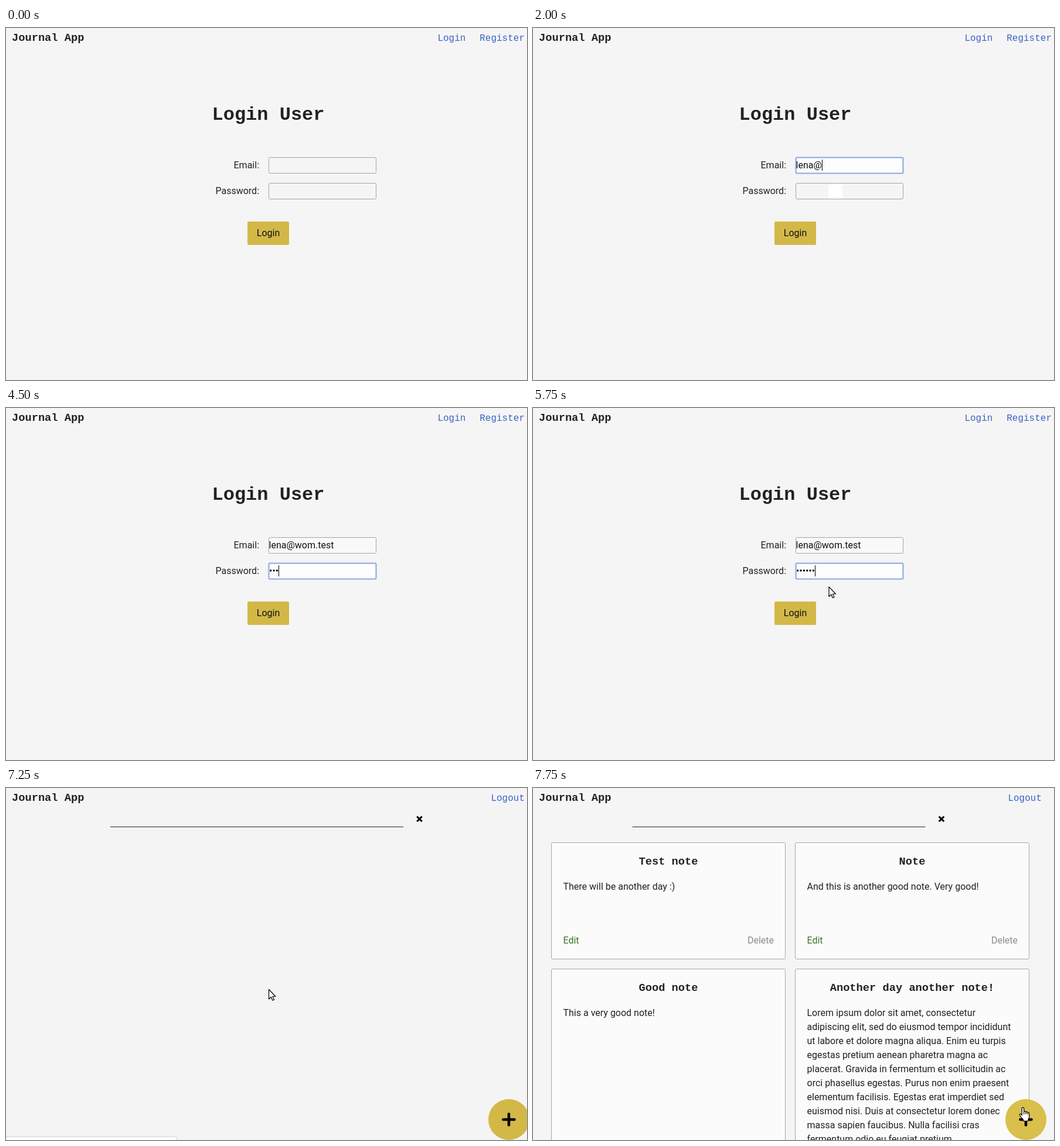
These frames come from a looping animation (889 px wide and 602 px high, 8000 ms). An HTML page:

```html
<!DOCTYPE html>
<html lang="en">
<head>
<meta charset="utf-8">
<title>Journal App</title>
<style>
  html, body { margin: 0; width: 100%; height: 100%; overflow: hidden; background: #f5f5f5; }
  svg { display: block; width: 100%; height: 100%; }
  text { font: 16px Roboto, sans-serif; fill: #222; }
  .mono { font-family: "Courier New", "Liberation Mono", monospace; }
  .title { font-size: 18.72px; font-weight: bold; }
  .heading { font-size: 32px; font-weight: bold; }
  .link { fill: #3b63c4; }
  .edit { fill: #3d7429; }
  .delete { fill: #8b8b8b; }
  .end { text-anchor: end; }
  .mid { text-anchor: middle; }
  .field { fill: #f5f5f5; stroke: #a3a3a3; }
  .field.filled { fill: #f9f9f9; }
  .field.focus { fill: #fdfdfd; stroke: #86a8e0; stroke-width: 2; }
  .button { fill: #d3b847; }
  .button.hover { fill: #f2d75f; }
  .button.focus { stroke: #8db2c4; stroke-width: 2; }
  .card { fill: #fbfbfb; stroke: #a8a8a8; }
  .cursor { fill: #fff; stroke: #000; stroke-width: 1.2; stroke-linejoin: round; }
</style>
</head>
<body>
<svg viewBox="0 0 889 602">
  <rect id="page" width="889" height="602"/>
  <text class="mono title" x="10" y="22">Journal App</text>

  <g id="login">
    <text class="mono link" x="736.4" y="22">Login</text>
    <text class="mono link" x="808.2" y="22">Register</text>
    <text class="mono heading mid" x="447.5" y="157">Login User</text>
    <text class="end" x="432" y="240">Email:</text>
    <text class="end" x="432" y="284">Password:</text>
    <rect id="emailField" class="field" x="448.5" y="221.5" width="183" height="27" rx="2"/>
    <rect id="passwordField" class="field" x="448.5" y="265.5" width="183" height="27" rx="2"/>
    <rect id="patch" x="504" y="266" width="24" height="26" fill="#fff"/>
    <text id="email" x="448.5" y="240" style="fill:#111"></text>
    <g id="dots"></g>
    <rect id="caret" width="1" height="19"/>
    <rect id="button" class="button" x="412" y="331" width="71" height="40" rx="2"/>
    <text class="mid" x="447.5" y="356" style="fill:#111">Login</text>
  </g>

  <g id="journal">
    <g id="cards"></g>
    <g id="chrome">
      <text class="mono link end" x="885" y="22">Logout</text>
      <path id="search" d="M178 66.5h500" stroke="#222"/>
      <path id="clear" d="M701.2 48.7l8.6 8.6m0-8.6l-8.6 8.6" stroke="#000" stroke-width="3"/>
      <g id="add">
        <circle id="disc" cx="858" cy="567" r="35"/>
        <path d="M848.5 567h19m-9.5-9.5v19" stroke="#000" stroke-width="4.6" stroke-linecap="round"/>
      </g>
    </g>
    <rect id="status" x="-5" y="596.5" width="296.5" height="20" rx="4" fill="#fff" stroke="#cfcfcf"/>
  </g>

  <g id="cursor">
    <path id="beam" d="M-3.5 -8.5h2.5l1 1 1-1h2.5M0 -7.5v15M-3.5 8.5h2.5l1-1 1 1h2.5" fill="none" stroke="#222"/>
    <path id="arrow" class="cursor" d="M0 0V16.5L3.8 13 6.4 18.7 9 17.5 6.5 12H11.5Z"/>
    <path id="hand" class="cursor" d="M-1.7 14V2Q-1.7 .3 0 .3T1.7 2V7.5Q3.4 5.8 5 8.2 6.7 7 8.2 9 10.6 8.4 10.8 11V16Q10.8 19 9 20.5V23.5H.5V21Q-3.5 17.5-5.7 13.5-6 11.5-4.5 11.4-3 11.5-1.7 14ZM1.7 7.5V12M5 8.2V12M8.2 9V12.5"/>
  </g>
</svg>
<script>
const $ = id => document.getElementById(id);
const show = (id, on) => $(id).style.display = on ? '' : 'none';

const LOOP = 8000, STEP = 250;
const address = 'lena@wom.test';

const notes = [
  [31, 93, 'Test note', ['There will be another day :)']],
  [447, 93, 'Note', ['And this is another good note. Very good!']],
  [31, 309, 'Good note', ['This a very good note!']],
  [447, 309, 'Another day another note!', [
    'Lorem ipsum dolor sit amet, consectetur',
    'adipiscing elit, sed do eiusmod tempor incididunt',
    'ut labore et dolore magna aliqua. Enim eu turpis',
    'egestas pretium aenean pharetra magna ac',
    'placerat. Gravida in fermentum et sollicitudin ac',
    'orci phasellus egestas. Purus non enim praesent',
    'elementum facilisis. Egestas erat imperdiet sed',
    'euismod nisi. Duis at consectetur lorem donec',
    'massa sapien faucibus. Nulla facilisi cras',
    'fermentum odio eu feugiat pretium']]
];

$('cards').innerHTML = notes.map(([x, y, title, lines]) => `
  <g transform="translate(${x} ${y})">
    <rect class="card" x=".5" y=".5" width="399" height="${y < 300 ? 199 : 400}" rx="2"/>
    <text class="mono title mid" x="200" y="38">${title}</text>
    ${lines.map((line, i) => `<text x="20.5" y="${81 + 24 * i}">${line}</text>`).join('')}
    ${y < 300 ? '<text class="edit" x="20.5" y="173">Edit</text><text class="delete end" x="380" y="173">Delete</text>' : ''}
  </g>`).join('');

// [start time, value] pairs; each value holds until the next one
const emailLength = [[0, 0], [1500, 1], [1750, 3], [2000, 5], [2500, 7], [2750, 8], [3000, 10], [3250, 11], [3500, 13]];
const dotCount = [[0, 0], [4250, 1], [4500, 3], [5000, 5], [5250, 6]];
const focused = [[0, ''], [750, 'email'], [3750, 'password'], [6250, 'button']];
const pointer = [
  [0, null], [250, ['beam', 516, 279]], [500, ['beam', 543, 239]], [1000, ['beam', 490, 247]], [1500, null],
  [5500, ['beam', 572, 238]], [5750, ['arrow', 505, 306]], [6000, ['hand', 455.5, 344]],
  [7000, ['arrow', 448.5, 344.5]], [7500, ['arrow', 650.5, 450.5]], [7750, ['hand', 836, 546]]
];
const at = (track, t) => track.findLast(([start]) => start <= t)[1];

function drawLogin(t) {
  const focus = at(focused, t), length = at(emailLength, t), dots = at(dotCount, t);
  $('email').textContent = address.slice(0, length);
  $('dots').innerHTML = Array.from({ length: dots }, (_, i) =>
    `<circle cx="${451.7 + 5.35 * i}" cy="278" r="1.7"/>`).join('');
  for (const [name, filled] of [['email', length], ['password', dots]]) {
    $(name + 'Field').classList.toggle('focus', focus === name);
    $(name + 'Field').classList.toggle('filled', filled > 0);
  }
  $('button').classList.toggle('hover', t >= 6000);
  $('button').classList.toggle('focus', focus === 'button');
  show('patch', t >= 500 && t < 3750);
  show('caret', focus === 'email' || focus === 'password');
  const inEmail = focus === 'email';
  const width = inEmail ? (length ? $('email').getComputedTextLength() : 0) : dots * 5.35;
  $('caret').setAttribute('x', Math.round(449 + width));
  $('caret').setAttribute('y', inEmail ? 225 : 269);
}

function drawJournal(t) {
  const loaded = t >= 7500;
  show('cards', loaded);
  show('status', t >= 7250 && !loaded);
  // the page narrows by a scrollbar's width once the notes load
  $('chrome').setAttribute('transform', `translate(${loaded ? -17 : 0} 0)`);
  for (const id of ['search', 'clear'])
    $(id).setAttribute('transform', `translate(${loaded ? 8.5 : 0} 0)`);
  $('disc').setAttribute('fill', t >= 7750 ? '#d9bf4c' : '#d3b847');
}

function draw(now) {
  const t = Math.floor(now % LOOP / STEP) * STEP;
  const loggedIn = t >= 7000;
  show('login', !loggedIn);
  show('journal', loggedIn);
  $('page').setAttribute('fill', loggedIn && t < 7500 ? '#f4f4f4' : '#f5f5f5');
  if (loggedIn) drawJournal(t); else drawLogin(t);

  const [shape, x, y] = at(pointer, t) || ['', 0, 0];
  for (const id of ['beam', 'arrow', 'hand']) show(id, id === shape);
  $('cursor').setAttribute('transform', `translate(${x} ${y})`);
}

const start = performance.now();
function tick() {
  draw(performance.now() - start);
  requestAnimationFrame(tick);
}
tick();
</script>
</body>
</html>
```
